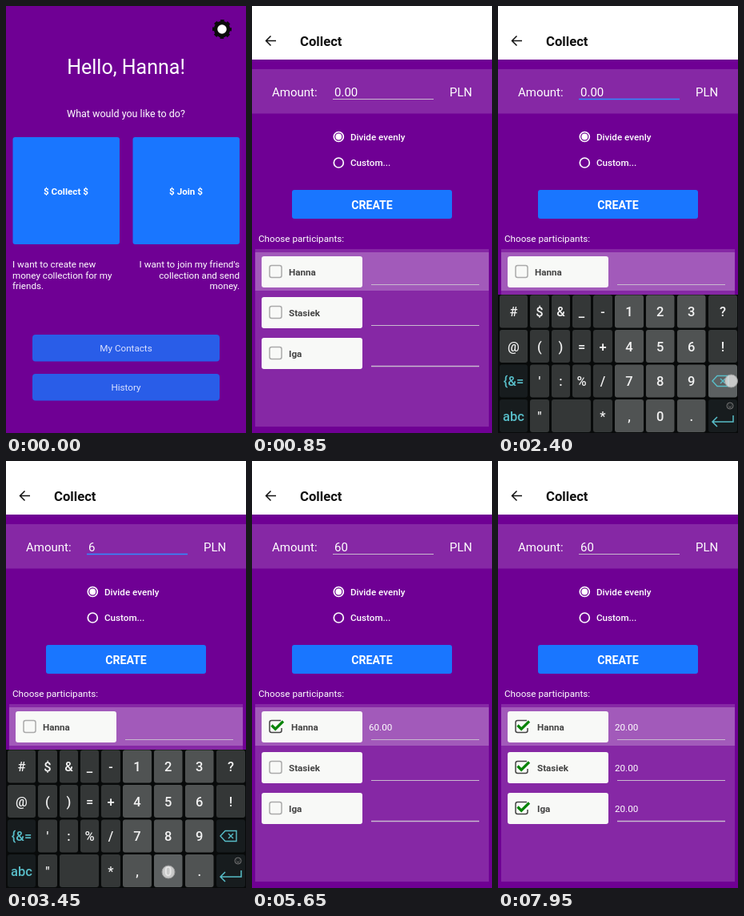
An HTML page for the animation above (8000 ms loop, 300x534 px).

```html
<!DOCTYPE html>
<html lang="en">
<head>
<meta charset="utf-8">
<title>Money collection</title>
<style>
  html, body { margin: 0; width: 100%; height: 100%; overflow: hidden; background: #6f0094; }
  svg { display: block; width: 100vw; height: 100vh; font-family: Roboto, sans-serif; }
  /* Every layer fades on its own, so overlapping layers show through each other. */
  #collect > * { opacity: var(--fade); }
</style>
</head>
<body>
<svg id="stage" viewBox="0 0 300 534"></svg>
<script>
const LOOP = 8000;
const PURPLE = '#6f0094', BLUE = '#1976ff', CYAN = '#58bdc8';
const names = ['Hanna', 'Stasiek', 'Iga'];
const checkTimes = [5230, 5830, 6430];
const edits = [[0, '0.00'], [2450, '0.0'], [2600, '0.'], [2750, '0'], [2900, ''], [3200, '6'], [3500, '60']];
const taps = [
  { key: 'back', from: 2330, to: 2920, x: 291.5, y: 469 },
  { key: '6', from: 3150, to: 3250, x: 241, y: 427 },
  { key: '0', from: 3450, to: 3550, x: 203, y: 514 },
];

const rect = (x, y, w, h, fill, r = 0, extra = '') =>
  `<rect x="${x}" y="${y}" width="${w}" height="${h}" rx="${r}" fill="${fill}" ${extra}/>`;
const text = (x, y, content, size = 11.67, fill = '#fff', extra = '') =>
  `<text x="${x}" y="${y}" font-size="${size}" fill="${fill}" ${extra}>${content}</text>`;
const line = (d, stroke, width, extra = '') =>
  `<path d="${d}" fill="none" stroke="${stroke}" stroke-width="${width}" ${extra}/>`;
const ring = (x, y, r, stroke, width, fill = 'none', extra = '') =>
  `<circle cx="${x}" cy="${y}" r="${r}" fill="${fill}" stroke="${stroke}" stroke-width="${width}" ${extra}/>`;
const middle = 'text-anchor="middle"', end = 'text-anchor="end"';
const bold = 'font-weight="700"', medium = 'font-weight="500"';

function homeScreen() {
  const notes = [
    ['I want to create new', "I want to join my friend's"],
    ['money collection for my', 'collection and send'],
    ['friends.', 'money.'],
  ];
  return rect(0, 0, 300, 534, PURPLE) +
    ring(270, 29, 8, '#0b0b0b', 4.5, '#fff') +
    ring(270, 29, 10.5, '#0b0b0b', 3, 'none', 'stroke-dasharray="4.6 3.647" stroke-dashoffset="2.3"') +
    text(150, 85, `Hello, ${names[0]}!`, 25, '#fff', middle) +
    text(150, 139, 'What would you like to do?', 12.5, '#fff', middle) +
    rect(8.5, 164, 133.5, 134, BLUE, 3) + rect(158.5, 164, 133.5, 134, BLUE, 3) +
    text(75, 235.5, '$ Collect $', 11.67, '#fff', middle + bold) +
    text(225, 235.5, '$ Join $', 11.67, '#fff', middle + bold) +
    notes.map(([left, right], i) =>
      text(8, 327 + 13.7 * i, left) + text(292, 327 + 13.7 * i, right, 11.67, '#fff', end)).join('') +
    ['My Contacts', 'History'].map((label, i) =>
      rect(33, 411 + 49 * i, 234, 33.5, '#295de8', 4) +
      text(150, 432 + 49 * i, label, 11.67, '#dce2ff', middle)).join('');
}

function participant(name, i) {
  const box = rect(22, 324.5, 15, 15, 'none', 2.5, `stroke="#aaa" stroke-width="1.5" id="box${i}"`);
  const tick = `<g id="tick${i}">` +
    line('M36 324.5H24.5q-2.5 0-2.5 2.5v10q0 2.5 2.5 2.5h10q2.5 0 2.5-2.5v-3', '#444', 1.5) +
    line('M24.5 330.5l4.7 4.7L39 325.5', '#088408', 3.3) + '</g>';
  return `<g transform="translate(0 ${51 * i})"><g id="card${i}">` +
    rect(12, 313, 126, 39, '#f8f9f7', 3) + box + tick +
    text(46, 337, name, 11.67, '#444', `${bold} id="name${i}"`) + '</g>' +
    line('M149 348.5H284', '#c8b9cf', i === 2 ? 1.5 : 1) +
    text(146, 337, '', 11.67, '#fff', `id="share${i}"`) + '</g>';
}

function collectScreen() {
  const pale = 'fill-opacity=".155"';
  return rect(0, 0, 300, 576, '#fff') + rect(0, 0, 300, 576, PURPLE) +
    rect(0, 0, 300, 67, '#fff') +
    line('M30 43.5H18M23.5 37.5l-6 6 6 6', '#111', 1.5) +
    text(60, 50, 'Collect', 16.67, '#111', bold) +
    rect(0, 79, 300, 55.5, '#fff', 0, pale) +
    text(25, 113, 'Amount:', 15) + text(103, 113, '', 15, '#fff', 'id="amount"') +
    text(247, 113, 'PLN', 15) + line('M101 116.5H227', '#c8b9cf', 1, 'id="underline"') +
    ring(108.3, 163.5, 6, '#fff', 1.7) + '<circle cx="108.3" cy="163.5" r="3.9" fill="#fff"/>' +
    ring(108.3, 196, 6, '#fff', 1.7) +
    text(123, 168, 'Divide evenly', 11.67, '#fff', medium) +
    text(123, 200.3, 'Custom...', 11.67, '#fff', medium) +
    rect(50, 230, 200, 36, BLUE, 3) + text(150, 253.5, 'CREATE', 14.17, '#fff', middle + bold) +
    text(8, 295, 'Choose participants:') +
    rect(4, 304, 292, 222, '#fff', 0, pale) + rect(4, 308, 292, 48, '#fff', 0, 'fill-opacity=".23"') +
    names.map(participant).join('');
}

function keyboard() {
  const columns = [[2, 35], [40, 24], [67, 23], [93, 23], [119, 24], [146, 36], [185, 35.5], [224, 35.5], [263, 36]];
  const rows = [
    ['#', '$', '&', '_', '-', '1', '2', '3', '?'],
    ['@', '(', ')', '=', '+', '4', '5', '6', '!'],
    ['{&=', "'", ':', '%', '/', '7', '8', '9', 'back'],
    ['abc', '"', 'space', '', '*', ',', '0', '.', 'enter'],
  ];
  const unlabelled = ['space', 'back', 'enter'];
  let out = rect(0, 361, 300, 173, '#080a0a');
  rows.forEach((row, r) => row.forEach((key, c) => {
    if (!key) return;
    const [x, w] = columns[c], y = 361.5 + 43.5 * r;
    const special = r > 1 && (c === 0 || c === 8);
    const fill = special ? '#171c1e' : c > 4 && c < 8 ? '#505353' : '#343737';
    const id = key === '"' ? 'quote' : key;
    out += rect(x, y, key === 'space' ? 49 : w, 41, fill, 3, `id="key-${id.replace('&', '&amp;')}"`);
    if (!unlabelled.includes(key))
      out += text(x + w / 2, y + 26.5, key.replace('&', '&amp;'), 16.5, special ? CYAN : '#f2f2f2', middle + medium);
  }));
  return out +
    line('M268 469l6-6.5h14v13h-14zM278 466l6 6m0-6l-6 6', CYAN, 1.4) +
    line('M294 512v8h-26m6-6l-6 6 6 6', CYAN, 1.5) +
    ring(290, 500, 4, '#777', 1) + line('M288 501q2 2 4 0M288.5 498.5v1M291.5 498.5v1', '#777', 1);
}

const stage = document.getElementById('stage');
stage.innerHTML = homeScreen() + `<g id="collect">${collectScreen()}</g>` +
  `<g id="keyboard">${keyboard()}</g>` + ring(0, 0, 8, '#aaa', 1, '#e4e4e4', 'id="touch" opacity=".8"');

const el = id => document.getElementById(id);
const set = (id, attribute, value) => el(id).setAttribute(attribute, value);
const show = (id, visible) => set(id, 'visibility', visible ? 'visible' : 'hidden');
const progress = (t, start, duration) => Math.min(1, Math.max(0, (t - start) / duration));
const easeInOut = p => p < .5 ? 2 * p * p : 1 - 2 * (1 - p) ** 2;
const fadeIn = p => p < .5 ? p / 2 : p < .9 ? .25 + (p - .5) * 1.125 : .7 + (p - .9) * 3;

for (const tap of taps) tap.fill = el('key-' + tap.key).getAttribute('fill');

function render(t) {
  const enter = 1 - (1 - progress(t, 460, 350)) ** 4;
  el('collect').style.setProperty('--fade', fadeIn(enter));
  set('collect', 'transform', `translate(0 ${41.7 * (1 - enter)})`);

  const focused = t >= 1200 && t < 4900;
  set('underline', 'stroke', focused ? '#2f8cff' : '#c8b9cf');
  set('underline', 'stroke-width', focused ? 1.6 : 1);
  el('amount').textContent = edits.findLast(([time]) => t >= time)[1];

  const raised = easeInOut(progress(t, 1250, 200)) - easeInOut(progress(t, 3900, 150));
  show('keyboard', raised > 0);
  set('keyboard', 'transform', `translate(0 ${173 * (1 - raised)})`);

  show('touch', false);
  for (const { key, from, to, x, y, fill } of taps) {
    const down = t >= from && t < to;
    set('key-' + key, 'fill', down ? '#5c6061' : fill);
    if (!down) continue;
    show('touch', true);
    set('touch', 'transform', `translate(${x} ${y})`);
  }

  const count = checkTimes.filter(time => t >= time).length;
  checkTimes.forEach((time, i) => {
    const checked = t >= time;
    const dim = easeInOut(progress(t, time - 100, 100)) - easeInOut(progress(t, time, 250));
    set('card' + i, 'opacity', 1 - .8 * dim);
    show('box' + i, !checked);
    show('tick' + i, checked);
    set('name' + i, 'x', checked ? 49 : 46);
    el('share' + i).textContent = checked ? (60 / count).toFixed(2) : '';
  });
}

function frame() {
  render(performance.now() % LOOP);
  requestAnimationFrame(frame);
}
frame();
</script>
</body>
</html>
```
